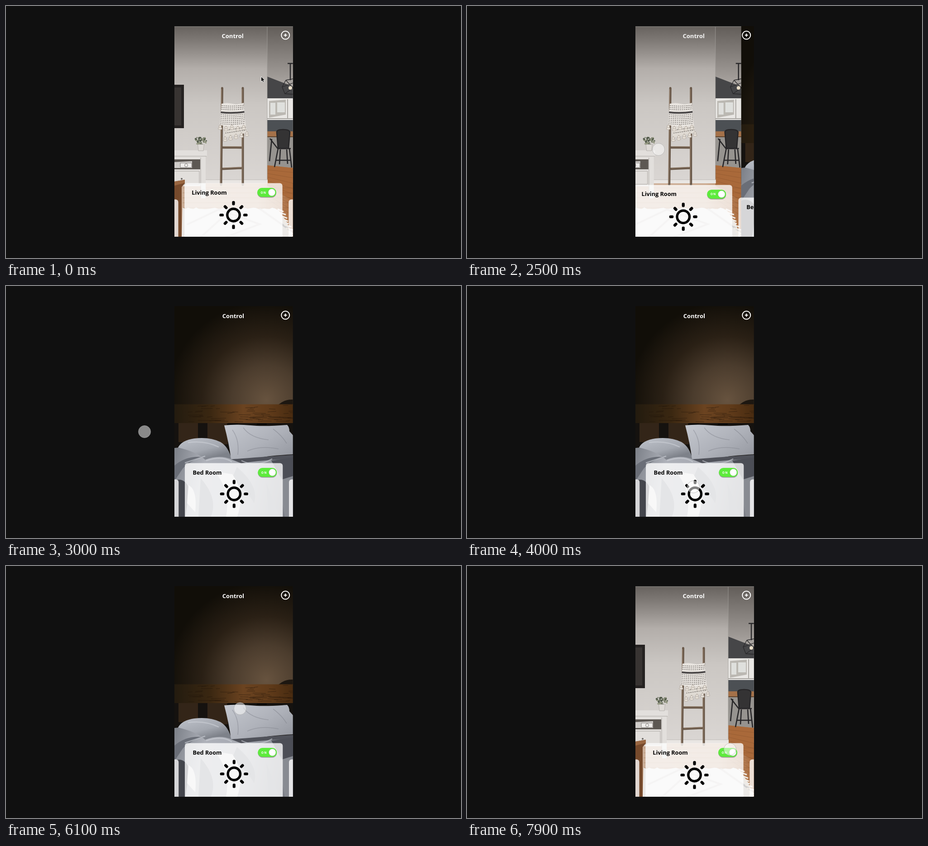
Write an HTML page that moves like this. It is 1005 px wide and 557 px high and loops after 8000 ms.

```html
<!DOCTYPE html>
<html lang="en">
<head>
<meta charset="utf-8">
<title>Room control</title>
<style>
  html, body { margin: 0; width: 100%; height: 100%; overflow: hidden; background: #101010; }
  svg { display: block; width: 100vw; height: 100vh; }
  text { font-family: "Open Sans", "Noto Sans", sans-serif; font-weight: 700; }
</style>
</head>
<body>
<svg viewBox="0 0 1005 557">
  <defs>
    <clipPath id="phone"><rect x="372" y="44.500" width="261.700" height="465.500"/></clipPath>
    <linearGradient id="wall" x2="0" y2="1">
      <stop offset="0" stop-color="#67625e"/><stop offset=".1" stop-color="#817c78"/>
      <stop offset=".27" stop-color="#b3aeaa"/><stop offset=".5" stop-color="#cbc7c3"/>
      <stop offset="1" stop-color="#dad6d3"/>
    </linearGradient>
    <linearGradient id="ceiling" x2="0" y2="1">
      <stop offset="0" stop-color="#625d59"/><stop offset="1" stop-color="#b0aba7"/>
    </linearGradient>
    <linearGradient id="floor" x2="1" y2="0">
      <stop offset="0" stop-color="#ccb09a"/><stop offset=".7" stop-color="#cba98e"/><stop offset="1" stop-color="#a9693a"/>
    </linearGradient>
    <radialGradient id="night" gradientUnits="userSpaceOnUse" cx="575" cy="252" r="218">
      <stop offset="0" stop-color="#67533f"/><stop offset=".35" stop-color="#4b3c2d"/>
      <stop offset=".65" stop-color="#2a2015"/><stop offset="1" stop-color="#110e08"/>
    </radialGradient>
    <linearGradient id="board">
      <stop offset="0" stop-color="#231b0f"/><stop offset=".3" stop-color="#3a2711"/>
      <stop offset=".58" stop-color="#6b4320"/><stop offset=".8" stop-color="#603b1a"/><stop offset="1" stop-color="#482b10"/>
    </linearGradient>
    <linearGradient id="sheet" gradientUnits="userSpaceOnUse" x1="372" y1="380" x2="634" y2="440">
      <stop offset="0" stop-color="#7f838b"/><stop offset=".25" stop-color="#aeb1b9"/>
      <stop offset=".6" stop-color="#a5a8b0"/><stop offset="1" stop-color="#787b83"/>
    </linearGradient>
    <linearGradient id="mound" gradientUnits="userSpaceOnUse" x1="410" y1="335" x2="425" y2="388">
      <stop offset="0" stop-color="#b9bdc5"/><stop offset=".6" stop-color="#a4a8b0"/><stop offset="1" stop-color="#7d8189"/>
    </linearGradient>
    <linearGradient id="pillow" x2="1" y2=".8">
      <stop offset="0" stop-color="#c5c8cf"/><stop offset=".6" stop-color="#aeb1b9"/><stop offset="1" stop-color="#989ba3"/>
    </linearGradient>
  </defs>
  <rect width="1005" height="557" fill="#101010"/>
  <g clip-path="url(#phone)">
    <g id="living">
      <rect x="372" y="45" width="262" height="346" fill="url(#wall)"/>
      <rect x="577" y="45" width="57" height="140" fill="url(#ceiling)"/>
      <path d="M577 156L634 178V206H577Z" fill="#464648"/>
      <rect x="577" y="204" width="57" height="48" fill="#e9e7e4"/>
      <path d="M581 210L618 207V240L581 247Z" fill="#bbb8b2"/>
      <path d="M584 214H595V240H584ZM599 213H616V235H599Z" fill="#dfe0dd"/>
      <path d="M622 206V250M577 249H634" stroke="#aaa7a3" stroke-width="2"/>
      <rect x="577" y="252" width="57" height="27" fill="#4c5054"/>
      <rect x="577" y="284" width="57" height="74" fill="#96938f"/>
      <path d="M577 277H634V290H577Z" fill="#a47149"/>
      <path d="M577 289H634" stroke="#60452f" stroke-width="2"/>
      <path d="M372 391H577V352L634 358V511H372Z" fill="url(#floor)"/>
      <path d="M577 352L634 358V430L577 398Z" fill="#a9693a"/>
      <path id="planks" fill="none" stroke="#714223" stroke-opacity=".3"/>
      <path d="M577 45V390" stroke="#a29e9a" stroke-opacity=".7" stroke-width="1.2"/>
      <path d="M440 384H578V392H440Z" fill="#e9e6e3"/>
      <path d="M440 384H578" stroke="#bdb9b5"/>
      <g fill="none" stroke="#29282a" stroke-width="1.3">
        <path d="M628 126V164M622 127H634" stroke-width="2.5"/>
        <path d="M618 164L634 161M618 164L610 179L616 194L634 195M618 164L634 181L616 194M610 179L634 170"/>
      </g>
      <circle cx="628" cy="181" r="4" fill="#e8ddc8"/>
      <g fill="none" stroke="#272628" stroke-width="2.6">
        <path d="M598 279Q598 273 612 273T627 279L624 315H601Z" fill="#343334"/>
        <path d="M583 293L600 315H629M587 294L582 343M601 315L593 356M626 315L631 357M606 317L604 350M620 317L622 349M596 341H628"/>
      </g>
      <path d="M372 174H393V270H372Z" fill="#252221"/>
      <path d="M372 180H387V264H372Z" fill="#383432"/>
      <path d="M372 319H444V332H441V425H431V398H372Z" fill="#e2dfdc"/>
      <path d="M372 332H443" stroke="#aaa6a2"/>
      <path d="M372 339H429V361H372Z" fill="#5d5853"/>
      <path d="M372 345L411 343V358H372Z" fill="#d0cdca"/>
      <path d="M385 347H410V357H385Z" fill="#efedeb" stroke="#827e7a"/>
      <circle cx="398" cy="352" r="3.5" fill="none" stroke="#827e7a"/>
      <path d="M372 365H427V394H372M430 335V420" fill="none" stroke="#aba7a3"/>
      <circle cx="388" cy="382" r="2" fill="#6c6864"/>
      <path d="M372 388L395 384V392L388 400V511H372Z" fill="#764a2c"/>
      <path d="M372 388L395 384V391L372 397Z" fill="#996641"/>
      <g id="leaves"></g>
      <path d="M423.5 306H437.5L436 320H425Z" fill="#dedad6" stroke="#a5a19d" stroke-width=".7"/>
      <g fill="none" stroke="#6a594a" stroke-linecap="round" stroke-width="5">
        <path d="M477.5 181.500L475 395M523 181.500V395M478 312.500L521 313M478 360L521 358"/>
        <path d="M476 184L473.800 392M521.500 184V392M480 311H520M480 358.500L519 356.500" stroke="#99836e" stroke-width="1.2"/>
      </g>
      <path d="M480 264L529 260L533 280L483 291Z" fill="#dfdad3"/>
      <path d="M476 216Q488 213 500 216T525 214L527 240L529 264Q500 269 472 263L474 240Z" fill="#e8e4df"/>
      <path d="M474.500 235Q500 238 526.500 234" fill="none" stroke="#4d4a4a" stroke-width="4"/>
      <path id="weave" fill="none" stroke="#625d59" stroke-width="1.1" stroke-dasharray="3 1.6"/>
      <g id="tassels" fill="#e6e0d8" stroke="#a49a90" stroke-width=".7"></g>
      <path id="rug" fill="#ebe9e7"/>
      <path d="M400 483L470 450L560 482L485 511M495 452L430 511M560 448L634 500" fill="none" stroke="#c5c5c5" stroke-width="4" stroke-opacity=".7"/>
      <path id="fringe" fill="none" stroke="#f0ebe5" stroke-width="3"/>
      <path d="M372 45.500H634" stroke="#827f7c" stroke-width="1.5"/>
    </g>
    <g id="bed">
      <rect x="372" y="44" width="262" height="219" fill="url(#night)"/>
      <path d="M602 262Q616 250 634 251V262Z" fill="#1d1711"/>
      <rect x="372" y="302" width="262" height="90" fill="#15120f"/>
      <path d="M381 303H424V345H381ZM445 303H490V350H445Z" fill="#332518"/>
      <rect x="372" y="261.500" width="262" height="41.500" fill="url(#board)"/>
      <path id="grain" fill="none" stroke="#1f1208" stroke-opacity=".5"/>
      <path d="M488 304H512V307H488ZM554 304H576V307H554Z" fill="#090807"/>
      <path d="M372 358Q388 357 400 350L482 353L500 382L634 374V511H372Z" fill="url(#sheet)"/>
      <path d="M380 357Q388 341 416 337Q450 333 474 345Q492 356 498 383Q470 372 440 384Q420 366 380 357Z" fill="url(#mound)"/>
      <path d="M482 308Q510 305 540 308T621 307Q626 312 626 321L634 330V372Q580 375 557 380T497 382Q493 350 482 308Z" fill="url(#pillow)"/>
      <path d="M500 318Q516 340 512 373M524 313Q540 336 580 340M533 365Q560 352 602 360M590 316Q610 331 620 348" fill="none" stroke="#7c7f88" stroke-opacity=".45" stroke-width="1.6"/>
      <path d="M497 383Q550 379 634 373V382Q560 385 520 392Z" fill="#50525a"/>
      <path d="M586 386L634 379V430H611Z" fill="#4c4e56"/>
      <path d="M372 397Q398 374 436 378Q406 386 390 404L372 431Z" fill="#6a6e77"/>
      <path d="M402 346Q440 341 470 356M442 386Q480 374 499 389M520 386Q553 402 588 382M395 391L440 376" fill="none" stroke="#ced1d7" stroke-width="2.500" stroke-opacity=".6"/>
      <path d="M372 430Q394 422 405 448L396 511H372Z" fill="#44464d"/>
      <path d="M602 430L634 420V511H616Z" fill="#888b92"/>
      <path d="M430 425Q470 470 452 511H425ZM510 400Q560 442 548 480Q529 446 497 431ZM575 435L604 510H580Z" fill="#868990"/>
      <path d="M460 410Q497 450 486 511H510Q530 460 500 416ZM403 440Q423 450 418 500L400 480Z" fill="#dfdfe2"/>
    </g>
    <g id="cards"></g>
    <g fill="#fff" font-size="13">
      <text id="headA" x="476.500" y="71">Control</text>
      <text id="headB" x="477.800" y="71">Control</text>
    </g>
    <g fill="none" stroke="#fff" stroke-width="2">
      <circle cx="617.200" cy="64.500" r="9"/>
      <path d="M613.700 64.500H620.700M617.200 61V68"/>
    </g>
  </g>
  <circle id="touch" r="13.500" fill="#fff" fill-opacity=".51" stroke="#aaa" stroke-opacity=".65"/>
  <path id="arrow" d="M563.500 156V167.500L566.200 165L568 169L570 168L568.200 164.200H571.800Z" fill="#000" stroke="#fff" stroke-width=".9"/>
</svg>
<script>
const $ = id => document.getElementById(id);
const LOOP = 8000, STEP = 100;
const clamp = v => Math.max(0, Math.min(1, v));
const easeInOut = u => u < .5 ? 4 * u ** 3 : 1 - 4 * (1 - u) ** 3;
const ramp = (t, from, length) => easeInOut(clamp((t - from) / length));
const list = (n, f) => Array.from({ length: n }, (_, i) => f(i)).join('');

let seed = 7;
const rnd = () => (seed = seed * 16807 % 2147483647) / 2147483647;

function drawTextures() {
  $('planks').setAttribute('d',
    list(9, i => `M577 ${362 + i * 8}L634 ${368 + i * 12}`) +
    list(5, i => `M390 ${402 + i * 11}H634`));
  $('leaves').innerHTML = list(46, i => {
    const a = rnd() * 6.28, r = 13 * Math.sqrt(rnd());
    const color = ['#4f5748', '#737966', '#92967f'][i % 3];
    return `<circle cx="${430 + r * Math.cos(a)}" cy="${298 + r * .75 * Math.sin(a)}" r="${1.3 + rnd()}" fill="${color}"/>`;
  });
  $('weave').setAttribute('d', list(11, i => {
    const y = 220 + i * 4;
    return y > 230 && y < 240 ? '' : `M${476 - i * .3} ${y}Q500 ${y + 3} ${526 + i * .2} ${y - 1}`;
  }) + 'M483 275L530 268M484 281L531 274');
  const tassel = (x, y) =>
    `<path d="M${x} ${y - 6}L${x + 4.5} ${y + 4}Q${x} ${y + 7} ${x - 4.5} ${y + 4}Z"/><circle cx="${x}" cy="${y - 2}" r="2.8"/>`;
  $('tassels').innerHTML =
    list(5, i => tassel(473 + i * 13, 268 + i % 2 * 3)) +
    list(5, i => tassel(484 + i * 12, 294 - i * 2.8));
  $('rug').setAttribute('d', 'M390 449' +
    list(35, i => `L${390 + i * 6} ${445 + rnd() * 4}`) +
    list(8, i => `L${602 + i * 4 + rnd() * 4} ${452 + i * 7}`) + 'V511H388Z');
  $('fringe').setAttribute('d', list(9, i => `M${600 + i * 3} ${449 + i * 7}l${12 + rnd() * 6} ${3 + rnd() * 4}`));
  $('grain').setAttribute('d', list(60, () => {
    const x = 400 + rnd() * 230;
    return `M${x} ${264 + rnd() * 36}l${8 + rnd() * 26} ${rnd() * 3 - 1.5}`;
  }));
}

// Card contents sit in the card's own coordinates.
function makeCard(room, dx, sunY) {
  const rays = list(8, i =>
    `<rect x="${i % 2 ? 19.800 : 21.500}" y="-3.100" width="9.600" height="6.200" rx="2.700" transform="rotate(${i * 45})"/>`);
  const content = room ? `
    <text x="${16 + dx * 1.6}" y="25" font-size="12.700">${room}</text>
    <g transform="translate(${160.700 + dx * .6} 10.500)">
      <rect y="1.500" width="42" height="20" rx="10" fill="#000" fill-opacity=".35"/>
      <rect class="track" width="42" height="20" rx="10"/>
      <text class="label" y="12.500" font-size="6.500" letter-spacing="1.2" fill="#fff"></text>
      <circle class="knob" cy="10" r="7.700" fill="#fff" stroke="#7d917a" stroke-opacity=".5" stroke-width=".6"/>
    </g>
    <g class="sun" transform="translate(${108.200 + dx * .6} ${sunY})">
      <circle r="13.700" fill="none" stroke="#000" stroke-width="5.400"/>${rays}
    </g>` : '';
  const g = document.createElementNS('http://www.w3.org/2000/svg', 'g');
  g.innerHTML = `<rect class="panel" width="216.300" height="150" rx="6" fill="#fff" fill-opacity=".78"/>${content}`;
  $('cards').append(g);
  return g;
}

function setPower(card, on) {
  const part = name => card.querySelector('.' + name);
  const off = 1 - on;
  part('track').setAttribute('fill', `rgb(${93 + 80 * off},${235 - 62 * off},${60 + 113 * off})`);
  part('knob').setAttribute('cx', 10 + 22 * on);
  part('label').textContent = on > .5 ? 'ON' : 'OFF';
  part('label').setAttribute('x', on > .5 ? 7.500 : 20);
  part('sun').setAttribute('opacity', 1 - .65 * off);
  part('panel').setAttribute('fill-opacity', .78 - .13 * off);
}

// Touch path: time, x, y
const path = [
  [100, 566, 165], [400, 612, 310], [600, 583, 412], [1300, 583, 412], [1700, 515, 291],
  [2300, 515, 297], [2500, 423, 317], [2700, 306, 322], [3200, 306, 322], [3700, 395, 360],
  [4000, 500, 444], [4400, 612, 76], [4600, 618, 80], [4900, 585, 412], [5700, 585, 412],
  [6200, 500, 291], [6500, 500, 291], [6900, 648, 280], [7050, 672, 279], [7300, 664, 290],
  [7900, 581, 405], [8000, 581, 405]
];
function touchAt(t) {
  const k = Math.max(1, path.findIndex(p => p[0] >= t));
  const [t0, x0, y0] = path[k - 1], [t1, x1, y1] = path[k];
  const u = clamp((t - t0) / (t1 - t0));
  return [x0 + (x1 - x0) * u, y0 + (y1 - y0) * u];
}

drawTextures();
const cards = [makeCard('', 0, 0), makeCard('Living Room', 0, 70.500), makeCard('Bed Room', 1, 68), makeCard('', 0, 0)];

function draw(t) {
  const page = ramp(t, 2350, 500) - ramp(t, 6570, 500);
  $('living').setAttribute('transform', `translate(${-262 * page})`);
  $('bed').setAttribute('transform', `translate(${262 * (1 - page)})`);
  cards.forEach((card, i) => {
    const d = i - 1 - page;
    card.setAttribute('transform', `translate(${394.300 + .7 * page + 230 * d} ${391.500 + 36 * Math.min(1, Math.abs(d))})`);
  });
  setPower(cards[1], 1 - ramp(t, 600, 200) + ramp(t, 1200, 200));
  setPower(cards[2], 1 - ramp(t, 4950, 200) + ramp(t, 5500, 200));
  $('headA').setAttribute('opacity', 1 - page);
  $('headB').setAttribute('opacity', page);

  const [x, y] = touchAt(t), pointer = t < 100;
  $('touch').setAttribute('transform', `translate(${x} ${y})`);
  $('touch').setAttribute('visibility', pointer ? 'hidden' : 'visible');
  $('arrow').setAttribute('visibility', pointer ? 'visible' : 'hidden');
}

const start = performance.now();
function frame(now) {
  const t = Math.max(0, now - start) % LOOP;
  draw(Math.floor(t / STEP) * STEP);
  requestAnimationFrame(frame);
}
draw(0);
requestAnimationFrame(frame);
</script>
</body>
</html>
```
